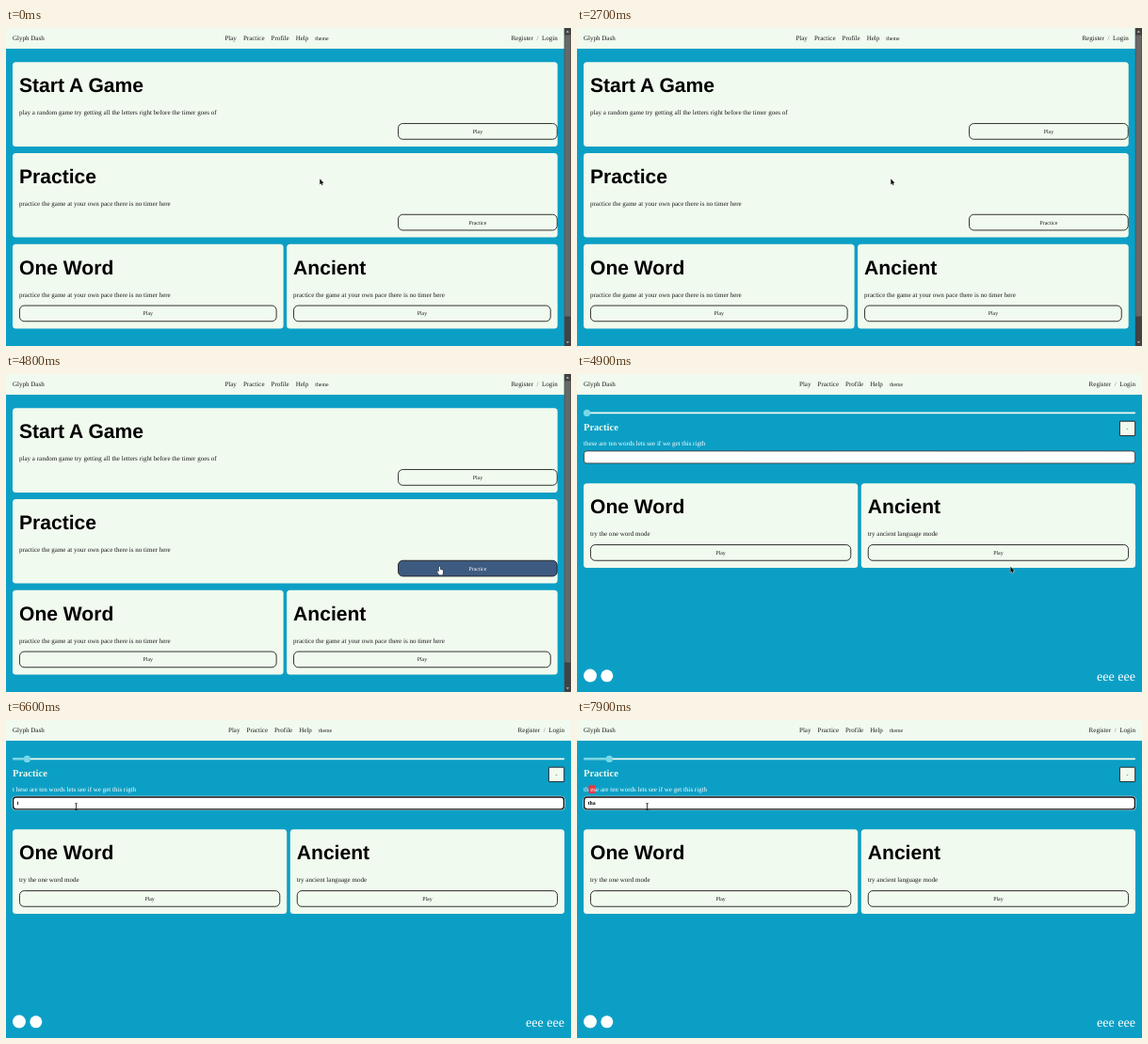
An HTML page with a canvas that plays this animation: 600x338 px, repeating every 8000 ms.

```html
<!DOCTYPE html>
<html lang="en">
<head>
<meta charset="utf-8">
<title>Glyph Dash</title>
<style>
html, body { margin: 0; width: 100%; height: 100%; overflow: hidden; background: #0c9fc5; }
canvas { display: block; width: 600px; height: 338px; }
</style>
</head>
<body>
<canvas id="stage"></canvas>
<script>
const W = 600, H = 338, LOOP = 8000, STEP = 100, PAGE_SWITCH = 4900;
const BLUE = '#0c9fc5', CREAM = '#f1faee', INK = '#1c1c1c', HOVER = '#3d5a80', RED = '#e63946', CYAN = '#78d8e8';
const SERIF = '"Liberation Serif", "Times New Roman", serif';
const SANS = '"Liberation Sans", Arial, sans-serif';
// Type sizes follow a 1366 px wide page shrunk to the stage.
const REM = 16 * W / 1366;
const BODY = `${REM}px ${SERIF}`;
const SMALL = `${REM * 5 / 6}px ${SERIF}`;
const SMALL_BOLD = `bold ${REM * 5 / 6}px ${SERIF}`;
const TITLE = `bold ${REM * 3}px ${SANS}`;
const SENTENCE = 'these are ten words lets see if we get this rigth';
const OWN_PACE = 'practice the game at your own pace there is no timer here';

const canvas = document.getElementById('stage');
const ratio = window.devicePixelRatio || 1;
canvas.width = Math.round(W * ratio);
canvas.height = Math.round(H * ratio);
const ctx = canvas.getContext('2d');
ctx.scale(ratio, ratio);
ctx.textRendering = 'geometricPrecision';

let mouse = { x: 0, y: 0 };
let pointer = 'arrow';

function text(str, x, y, font = BODY, color = INK, align = 'left') {
  ctx.font = font;
  ctx.fillStyle = color;
  ctx.textAlign = align;
  ctx.fillText(str, x, y);
  return ctx.measureText(str).width;
}

function rect(x, y, w, h, color) {
  ctx.fillStyle = color;
  ctx.fillRect(x, y, w, h);
}

function box(x, y, w, h, r, fill, stroke, line = 0.9) {
  ctx.beginPath();
  ctx.roundRect(x, y, w, h, r);
  if (fill) {
    ctx.fillStyle = fill;
    ctx.fill();
  }
  if (stroke) {
    ctx.strokeStyle = stroke;
    ctx.lineWidth = line;
    ctx.stroke();
  }
}

function dot(x, y, r, color) {
  ctx.beginPath();
  ctx.arc(x, y, r, 0, Math.PI * 2);
  ctx.fillStyle = color;
  ctx.fill();
}

function isOver(x, y, w, h) {
  return mouse.x >= x && mouse.x <= x + w && mouse.y >= y && mouse.y <= y + h;
}

function button(label, x, y, w) {
  const h = 17.6;
  const hot = isOver(x, y, w, h);
  if (hot) pointer = 'hand';
  box(x + 0.45, y + 0.45, w - 0.9, h - 0.9, 4.8, hot ? HOVER : CREAM, INK);
  text(label, x + w / 2, y + 10.8, SMALL, hot ? '#fff' : INK, 'center');
}

function card(x, y, w, title, line, label, wide) {
  box(x, y, w, 89.6, 3.5, CREAM);
  text(title, x + 7, y + 31.8, TITLE, '#000');
  text(line, x + 7, y + 56, BODY);
  if (wide) button(label, x + w - 169.6, y + 64.8, 169.6);
  else button(label, x + 7, y + 64.8, w - 14);
}

function nav(right) {
  rect(0, 0, right + 7, 22, CREAM);
  text('Glyph Dash', 7, 13.4);
  let x = (right + 7) / 2 - 64;
  for (const item of ['Play', 'Practice', 'Profile', 'Help']) {
    x += text(item, x, 13.4) + REM;
  }
  text('theme', x, 13.4, SMALL);
  text('Login', right, 13.4, BODY, INK, 'right');
  text('/', right - 20.3, 13.4, BODY, '#6c757d', 'right');
  text('Register', right - 26, 13.4, BODY, INK, 'right');
}

function triangle(x, y, dy) {
  ctx.beginPath();
  ctx.moveTo(x - 1.7, y);
  ctx.lineTo(x + 1.7, y);
  ctx.lineTo(x, y + dy);
  ctx.fillStyle = '#c0c0c0';
  ctx.fill();
}

function scrollbar() {
  rect(592.8, 0, 7.2, H, '#424242');
  rect(593.3, 7.5, 6.2, 299, '#686868');
  triangle(596.4, 4.7, -1.9);
  triangle(596.4, 333.2, 1.9);
}

function homePage() {
  nav(585.8);
  card(7, 36.3, 578.7, 'Start A Game', 'play a random game try getting all the letters right before the timer goes of', 'Play', true);
  card(7, 133, 578.7, 'Practice', OWN_PACE, 'Practice', true);
  card(7, 229.8, 287.6, 'One Word', OWN_PACE, 'Play');
  card(298.1, 229.8, 287.6, 'Ancient', OWN_PACE, 'Play');
  scrollbar();
}

function prompt(typed) {
  const y = 76;
  if (!typed) {
    text(SENTENCE, 7, y, BODY, '#fff');
    return;
  }
  const good = Math.min(typed.length, 2);
  let x = 7 + text(SENTENCE.slice(0, good), 7, y, BODY, '#fff');
  let rest = good;
  if (typed.length > good) {
    rect(x, 69.4, 7.4, 8.6, RED);
    x += text(' es', x, y, BODY, '#fff');
    rest = 4;
  } else {
    x += REM / 4;
  }
  text(SENTENCE.slice(rest), x, y, BODY, '#fff');
}

function input(typed, focused) {
  if (isOver(7, 81, 586, 15)) pointer = 'beam';
  if (focused) {
    box(6.8, 81.2, 586.4, 14.4, 3.6, '#fff', '#fff', 0.7);
    box(7.6, 82, 584.8, 12.8, 3, '#fff', '#101010', 1.3);
  } else {
    box(7.4, 81.9, 585.2, 13, 3, '#fff', '#3f3f3f', 0.9);
  }
  text(typed, 11.5, 90.2, SMALL_BOLD, '#000');
}

function practicePage(t) {
  const typed = 'tha'.slice(0, [6400, 7000, 7500].filter(at => t >= at).length);
  const knob = 10.5 + 11.9 * Math.min(typed.length, 2);
  nav(593);
  box(7, 40.5, 586, 1.7, 0.8, CREAM);
  box(7, 40.5, knob - 7, 1.7, 0.8, CYAN);
  dot(knob, 41.4, 3.6, CYAN);
  text('Practice', 7, 60, `bold ${REM * 1.5}px ${SERIF}`, CREAM);
  box(576.4, 50.2, 16.3, 15.4, 0.6, CREAM, INK);
  text('-', 584.5, 59.6, SMALL, INK, 'center');
  prompt(typed);
  input(typed, t >= 6200);
  card(7, 116.3, 291.2, 'One Word', 'try the one word mode', 'Play');
  card(301.8, 116.3, 291.2, 'Ancient', 'try ancient language mode', 'Play');
  dot(14, 320.6, 7, '#fff');
  dot(31.8, 320.8, 6.5, '#fff');
  text('eee eee', 593, 326.3, `${REM * 2}px ${SERIF}`, '#fff', 'right');
}

function outline(points, fill, stroke) {
  ctx.beginPath();
  points.forEach(([x, y]) => ctx.lineTo(mouse.x + x, mouse.y + y));
  ctx.closePath();
  ctx.lineJoin = 'round';
  ctx.lineWidth = 0.7;
  ctx.strokeStyle = stroke;
  ctx.stroke();
  ctx.fillStyle = fill;
  ctx.fill();
}

function drawPointer() {
  const { x, y } = mouse;
  if (pointer === 'beam') {
    rect(x - 0.4, y - 3.2, 0.8, 6.6, '#111');
    rect(x - 1.5, y - 3.5, 3, 0.6, '#111');
    rect(x - 1.5, y + 3.1, 3, 0.6, '#111');
  } else if (pointer === 'hand') {
    outline([[-0.6, 0], [0.6, 0], [0.8, 3], [3.4, 3.8], [3.8, 5], [3.2, 8.6],
      [-0.4, 8.6], [-2.6, 5.2], [-2, 4.6], [-0.8, 5.4]], '#fff', '#111');
  } else {
    outline([[0, 0], [0, 6.1], [1.4, 4.9], [2.3, 7], [3.2, 6.6], [2.3, 4.6], [4.1, 4.5]], '#0a0a0a', '#fff');
  }
}

function glide(t, start, end, from, to) {
  const p = Math.min(1, Math.max(0, (t - start) / (end - start)));
  const e = p * p * (3 - 2 * p);
  return { x: from[0] + (to[0] - from[0]) * e, y: from[1] + (to[1] - from[1]) * e };
}

function mouseAt(t) {
  const rest = [332.2, 160], link = [460.4, 204.8], field = [74.6, 92];
  if (t < 3500) return { x: 333.3, y: 160.3 };
  if (t < PAGE_SWITCH) return glide(t, 3900, 4700, rest, link);
  return glide(t, 5100, 6100, link, field);
}

function frame(now) {
  const t = Math.floor((now % LOOP) / STEP) * STEP;
  mouse = mouseAt(t);
  pointer = 'arrow';
  rect(0, 0, W, H, BLUE);
  if (t < PAGE_SWITCH) homePage();
  else practicePage(t);
  drawPointer();
}

const begin = performance.now();
function tick() {
  frame(performance.now() - begin);
  requestAnimationFrame(tick);
}
tick();
</script>
</body>
</html>
```
